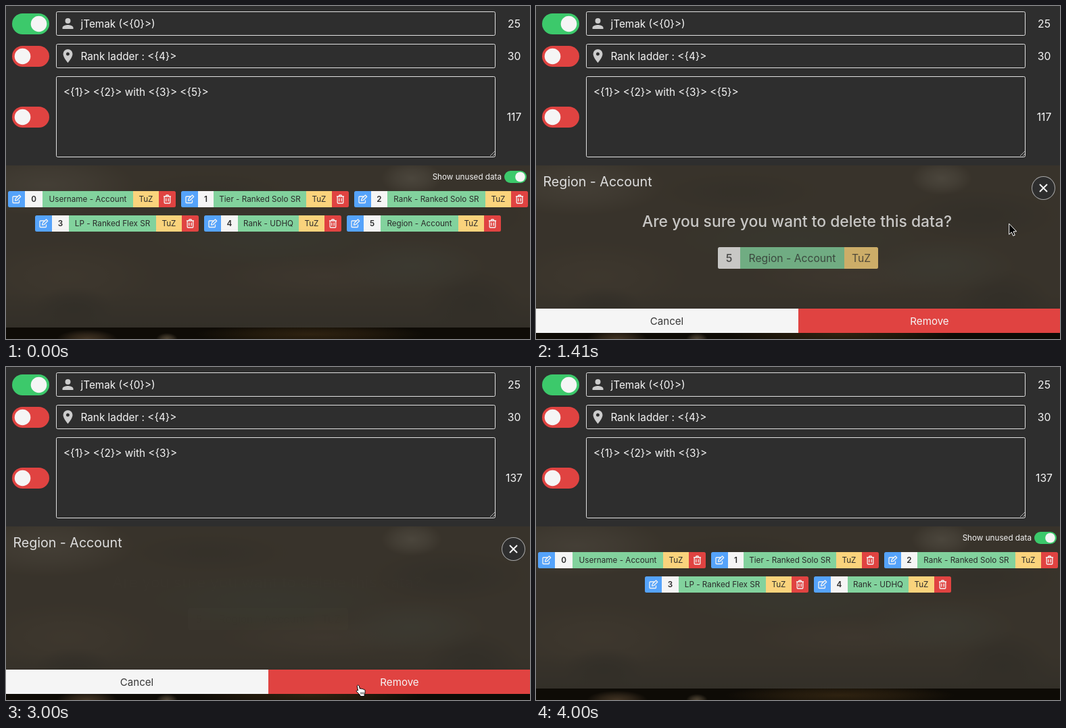
Animation of 775x493 px, one loop 5060 ms. Source, as an HTML page with a canvas:

```html
<!DOCTYPE html>
<html lang="en">
<head>
<meta charset="utf-8">
<title>Removing a data tag</title>
<style>
  html, body { margin: 0; height: 100%; overflow: hidden; background: #2e2e2e; }
  canvas { display: block; }
</style>
</head>
<body>
<canvas id="stage" width="775" height="493"></canvas>
<script>
const ctx = document.getElementById('stage').getContext('2d');
const W = 775, H = 493, LOOP = 5060;
const OPEN = 1040, REMOVE = 2740, CLOSE = 3040, FADE = 800, LEAVE = 300;
const DARK = '#2e2e2e', LIGHT = '#f5f5f5', RED = '#e04341', GREEN = '#3cc96b';
const BLUE = '#55a3fb', MINT = '#82d29d', YELLOW = '#fad37c';
const GAME = 'TuZ';

const PERSON = new Path2D('M12 12a4 4 0 1 0 0-8 4 4 0 0 0 0 8zm0 2c-2.7 0-8 1.3-8 4v2h16v-2c0-2.7-5.3-4-8-4z');
const PIN = new Path2D('M12 2a7 7 0 0 0-7 7c0 5.2 7 13 7 13s7-7.8 7-13a7 7 0 0 0-7-7zm0 9.5a2.5 2.5 0 1 1 0-5 2.5 2.5 0 0 1 0 5z');
const EDIT = new Path2D('M1.5-4H-4.500Q-5.500-4-5.500-3V4.500Q-5.500 5.500-4.500 5.500H3Q4 5.500 4 4.500V1.500M-2 2.200L-1.500-.5 4-6 6.200-3.800.700 1.700Z');
const TRASH = new Path2D('M-5.500-4H5.500M-2.500-4L-1.500-6H1.500L2.500-4M-4.300-4V5Q-4.300 6-3.300 6H3.300Q4.300 6 4.300 5V-4M-1.700-1.500V3.500M1.700-1.500V3.500');
const ARROW = new Path2D('M0 0V16L3.700 12.600 6 18 8.600 17 6.300 11.600H11Z');
const HAND = new Path2D('M-2 1.200C-2.200-.6.2-.9.8.8L2.200 5.200C3 4 4.600 4.300 5 5.600 5.800 4.600 7.200 5 7.500 6.200 8.400 5.600 9.600 6.100 9.700 7.400 10 10 9.600 11.500 8.800 13V16H2.600L2.400 14.600C1 12.600-.8 11-2.600 9.400-4 8-2.600 6.600-.8 7.600Z');

// number cell width, label width, label
const TAGS = [
  [26, 134, 'Username - Account'],
  [23, 137, 'Tier - Ranked Solo SR'],
  [24, 145, 'Rank - Ranked Solo SR'],
  [25, 129, 'LP - Ranked Flex SR'],
  [25, 90, 'Rank - UDHQ'],
  [25, 115, 'Region - Account'],
].map(([numW, labelW, label], id) => ({ id, numW, labelW, label, width: numW + labelW + 88 }));

// time, x, y
const POINTER = [
  [180, 485, 447], [300, 560, 402], [480, 672, 345], [650, 727, 316],
  [1000, 726, 320], [1230, 726, 320], [1410, 700, 322], [1760, 592, 400],
  [2050, 566, 440], [2290, 563, 460], [2850, 563, 460], [3180, 472, 485], [3240, 455, 494],
];

// background colour patches: x, y, rx, ry, rgb
const PATCHES = [
  [60, 265, 130, 45, '110,98,84'], [390, 345, 190, 40, '42,52,40'],
  [600, 255, 45, 25, '150,140,122'], [655, 310, 120, 40, '12,10,8'],
  [90, 400, 130, 50, '72,54,36'], [470, 400, 150, 30, '70,52,38'],
  [690, 445, 75, 55, '0,0,0'], [100, 450, 60, 35, '0,0,0'],
  [300, 275, 120, 30, '20,16,10'], [600, 385, 110, 40, '60,66,54'],
];
const EMBERS = [[120, 493, 45, 14, '74,58,40'], [238, 493, 16, 9, '90,78,60'], [450, 486, 170, 16, '52,38,18']];

const clamp = v => Math.min(1, Math.max(0, v));

// CSS "ease" curve
function ease(p) {
  p = clamp(p);
  let lo = 0, hi = 1, u = p;
  for (let i = 0; i < 16; i++) {
    u = (lo + hi) / 2;
    const x = .75 * u * (1 - u) + u ** 3;
    if (x < p) lo = u; else hi = u;
  }
  return .3 * u * (1 - u) ** 2 + 3 * u * u * (1 - u) + u ** 3;
}

function rect(x, y, w, h, color) {
  ctx.fillStyle = color;
  ctx.fillRect(x, y, w, h);
}

function pill(x, y, w, h, r, color) {
  ctx.beginPath();
  ctx.roundRect(x, y, w, h, r);
  ctx.fillStyle = color;
  ctx.fill();
}

function disc(x, y, r, color) {
  pill(x - r, y - r, 2 * r, 2 * r, r, color);
}

function line(color, width, ...points) {
  ctx.beginPath();
  for (let i = 0; i < points.length; i += 4) {
    ctx.moveTo(points[i], points[i + 1]);
    ctx.lineTo(points[i + 2], points[i + 3]);
  }
  ctx.strokeStyle = color;
  ctx.lineWidth = width;
  ctx.stroke();
}

// y is the middle of the capital letters
function text(str, x, y, size, color = LIGHT, align = 'left', weight = 400) {
  ctx.font = `${weight} ${size}px Inter, sans-serif`;
  ctx.textAlign = align;
  ctx.fillStyle = color;
  ctx.fillText(str, x, y + size * .36);
}

function icon(path, x, y, { fill, stroke, width = 1 }) {
  ctx.save();
  ctx.translate(x, y);
  ctx.lineWidth = width;
  ctx.lineJoin = 'round';
  if (fill) { ctx.fillStyle = fill; ctx.fill(path, 'evenodd'); }
  if (stroke) { ctx.strokeStyle = stroke; ctx.stroke(path); }
  ctx.restore();
}

function blob([x, y, rx, ry, rgb]) {
  ctx.save();
  ctx.translate(x, y);
  ctx.scale(rx, ry);
  const g = ctx.createRadialGradient(0, 0, 0, 0, 0, 1);
  g.addColorStop(0, `rgba(${rgb},.85)`);
  g.addColorStop(.5, `rgba(${rgb},.5)`);
  g.addColorStop(1, `rgba(${rgb},0)`);
  rect(-1, -1, 2, 2, g);
  ctx.restore();
}

function backdrop(bottom) {
  ctx.save();
  ctx.beginPath();
  ctx.rect(0, 236, W, H - 236);
  ctx.clip();
  rect(0, 236, W, H - 236, '#2a1e12');
  PATCHES.forEach(blob);
  const shade = ctx.createLinearGradient(0, 425, 0, 476);
  shade.addColorStop(0, 'rgba(14,11,6,0)');
  shade.addColorStop(1, 'rgb(14,11,6)');
  rect(0, 425, W, H - 425, shade);
  EMBERS.forEach(blob);
  rect(0, 236, W, bottom - 236, 'rgba(61,57,49,.8)');
  ctx.restore();
}

function toggle(y, on) {
  pill(9, y - 15.5, 55, 31, 15.5, on ? GREEN : RED);
  disc(on ? 48.5 : 24.5, y, 11.8, LIGHT);
}

function field(y, h) {
  ctx.beginPath();
  ctx.roundRect(74.5, y + .5, 649, h - 1, 2);
  ctx.strokeStyle = '#e2e2e2';
  ctx.lineWidth = 1;
  ctx.stroke();
}

function form(removed) {
  rect(0, 0, W, 236, DARK);
  toggle(26.5, true);
  toggle(74.5, false);
  toggle(164.5, false);
  field(8, 36);
  field(56, 36);
  field(104, 120);
  line('#b0b0b0', 1, 716, 222, 723, 215, 720, 222, 723, 219);
  icon(PERSON, 79.5, 14, { fill: '#cccccc' });
  icon(PIN, 79.5, 62, { fill: '#cccccc' });
  text('jTemak (<{0}>)', 110.5, 26.5, 15.3);
  text('Rank ladder : <{4}>', 110.5, 74.5, 15.3);
  text('<{1}> <{2}> with <{3}>' + (removed ? '' : ' <{5}>'), 85, 127.5, 15.3);
  text('25', 751.5, 26, 15.7, LIGHT, 'center');
  text('30', 751.5, 74, 15.7, LIGHT, 'center');
  text(removed ? '137' : '117', 751.5, 164, 15.7, LIGHT, 'center');
}

// a row of coloured cells: width, colour, text or icon, weight
function cells(x, y, h, size, list) {
  const total = list.reduce((sum, [w]) => sum + w, 0);
  ctx.save();
  ctx.beginPath();
  ctx.roundRect(x, y, total, h, 2.5);
  ctx.clip();
  for (const [w, color, content, weight] of list) {
    rect(x, y, w, h, color);
    if (content instanceof Path2D) icon(content, x + w / 2, y + h / 2, { stroke: LIGHT, width: 1.3 });
    else text(content, x + w / 2, y + h / 2, size, '#2a2a2a', 'center', weight);
    x += w;
  }
  ctx.restore();
}

function tagRow(tags, y) {
  let x = Math.floor((W - tags.reduce((sum, tag) => sum + tag.width + 8, -8)) / 2);
  for (const tag of tags) {
    cells(x, y, 24, 11.7, [
      [25, BLUE, EDIT], [tag.numW, LIGHT, String(tag.id), 600], [tag.labelW, MINT, tag.label],
      [38, YELLOW, GAME], [25, RED, TRASH],
    ]);
    x += tag.width + 8;
  }
}

function tagList(alpha, removed) {
  text('Show unused data', 733, 253, 11.7, LIGHT, 'right');
  pill(737, 244, 33, 18, 9, GREEN);
  disc(760.5, 253, 7.3, LIGHT);
  ctx.globalAlpha = alpha;
  tagRow(TAGS.slice(0, 3), 274);
  tagRow(TAGS.slice(3, removed ? 5 : 6), 310);
  ctx.globalAlpha = 1;
}

function dialog(alpha, hover) {
  text('Region - Account', 10.5, 259.5, 19.6, '#dedede');
  disc(750.5, 269.5, 17.5, '#a8a8a8');
  disc(750.5, 269.5, 16.5, DARK);
  line(LIGHT, 2, 745, 264, 756, 275, 756, 264, 745, 275);
  rect(0, 448, 388, 36, LIGHT);
  rect(388, 448, 387, 36, hover ? '#de3837' : RED);
  text('Cancel', 193.5, 466.5, 15.1, '#383838', 'center');
  text('Remove', 582, 466.5, 15.1, LIGHT, 'center');
  ctx.globalAlpha = alpha;
  text('Are you sure you want to delete this data?', 386, 319, 22.9, LIGHT, 'center', 500);
  cells(269, 357, 32, 15.7, [[33, LIGHT, '5', 600], [154, MINT, 'Region - Account'], [50, YELLOW, GAME]]);
  ctx.globalAlpha = 1;
}

function pointer(t) {
  const next = POINTER.findIndex(([time]) => time > t);
  if (next < 1) return;
  const [t0, x0, y0] = POINTER[next - 1], [t1, x1, y1] = POINTER[next];
  const p = (t - t0) / (t1 - t0);
  const x = x0 + (x1 - x0) * p, y = y0 + (y1 - y0) * p;
  const hand = (t > 590 && t < 1250) || (t > 2150 && t < CLOSE);
  if (hand) {
    icon(HAND, x, y, { fill: '#fff', stroke: '#000' });
    ctx.save();
    ctx.translate(x, y);
    line('#000', .8, 3.5, 10, 3.5, 13, 5.5, 10, 5.5, 13, 7.5, 10, 7.5, 13);
    ctx.restore();
  } else {
    icon(ARROW, x, y, { fill: '#000', stroke: '#fff' });
  }
}

function draw(t) {
  const open = t >= OPEN && t < CLOSE, removed = t >= REMOVE;
  form(removed);
  backdrop(open ? 484 : 476);
  if (open) {
    const alpha = removed ? 1 - ease((t - REMOVE) / LEAVE) : ease((t - OPEN) / FADE);
    dialog(alpha, t > 2200 && t < 2900);
  } else {
    const alpha = removed ? ease((t - CLOSE) / FADE) : 1 - ease((t - OPEN + LEAVE) / LEAVE);
    tagList(alpha, removed);
  }
  pointer(t);
}

const start = performance.now();
(function tick() {
  draw((performance.now() - start) % LOOP);
  requestAnimationFrame(tick);
})();
</script>
</body>
</html>
```
